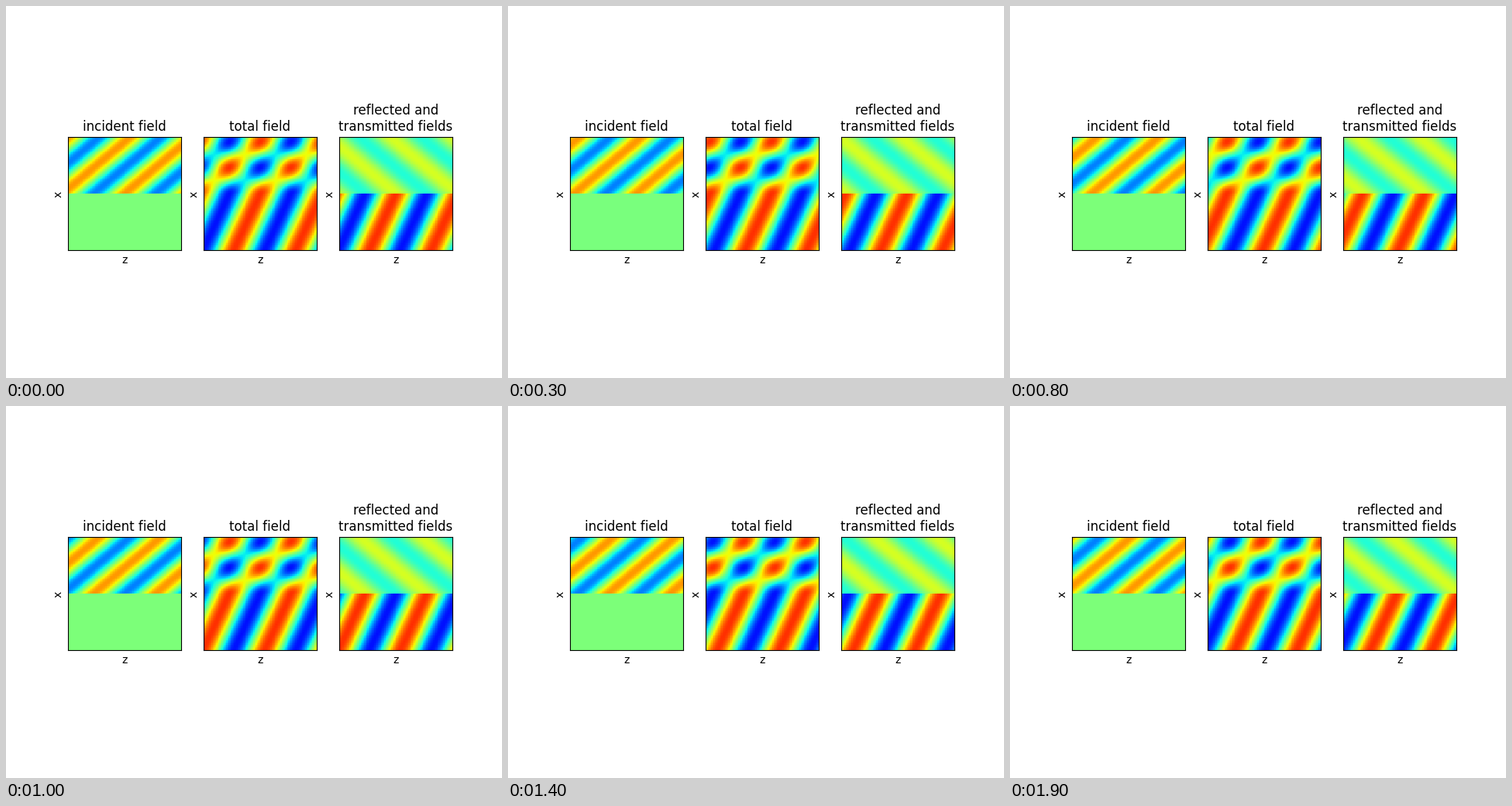
A matplotlib script for the animation above (2 s loop, 640 by 480 pixels).

```python
import numpy as np
import matplotlib.pyplot as plt
from matplotlib.animation import FuncAnimation

FRAMES = 20
INTERVAL = 100  # ms
N = 100         # grid cells per side

plt.rcParams["font.family"] = "DejaVu Sans"
plt.rcParams["toolbar"] = "None"

# Plane wave hitting an interface at x = 0, lengths in wavelengths of the lower medium
n1, n2 = 1.41, 1.0
angle = np.radians(40)
k = 2 * np.pi
kz = k * n1 * np.sin(angle)
kx1 = k * n1 * np.cos(angle)
kx2 = np.sqrt((k * n2) ** 2 - kz ** 2)
r = (kx1 - kx2) / (kx1 + kx2)
t = 1 + r

axis = np.linspace(-1, 1, N)
z, x = np.meshgrid(axis, axis)
upper = x < 0


def wave(kx):
    return np.exp(1j * (kz * z + kx * x))


incident = np.where(upper, wave(kx1), 0)
scattered = np.where(upper, r * wave(-kx1), t * wave(kx2))
fields = [incident, incident + scattered, scattered]
titles = ["incident field", "total field",
          "reflected and\ntransmitted fields"]

fig, axes = plt.subplots(1, 3, figsize=(6.4, 4.8), dpi=100)
images = []
for ax, field, title in zip(axes, fields, titles):
    images.append(ax.imshow(field.real, cmap="jet", vmin=-2, vmax=2,
                            interpolation="nearest"))
    ax.set_title(title, fontsize=12)
    ax.set_xlabel("z", fontsize=10)
    ax.set_ylabel("x", fontsize=10)
    ax.set_xticks([])
    ax.set_yticks([])


def update(frame):
    phase = np.exp(-2j * np.pi * frame / FRAMES)
    for image, field in zip(images, fields):
        image.set_data((field * phase).real)
    return images


anim = FuncAnimation(fig, update, frames=FRAMES, interval=INTERVAL,
                     init_func=lambda: update(0), repeat=True,
                     repeat_delay=0, blit=False)
plt.show()
```
